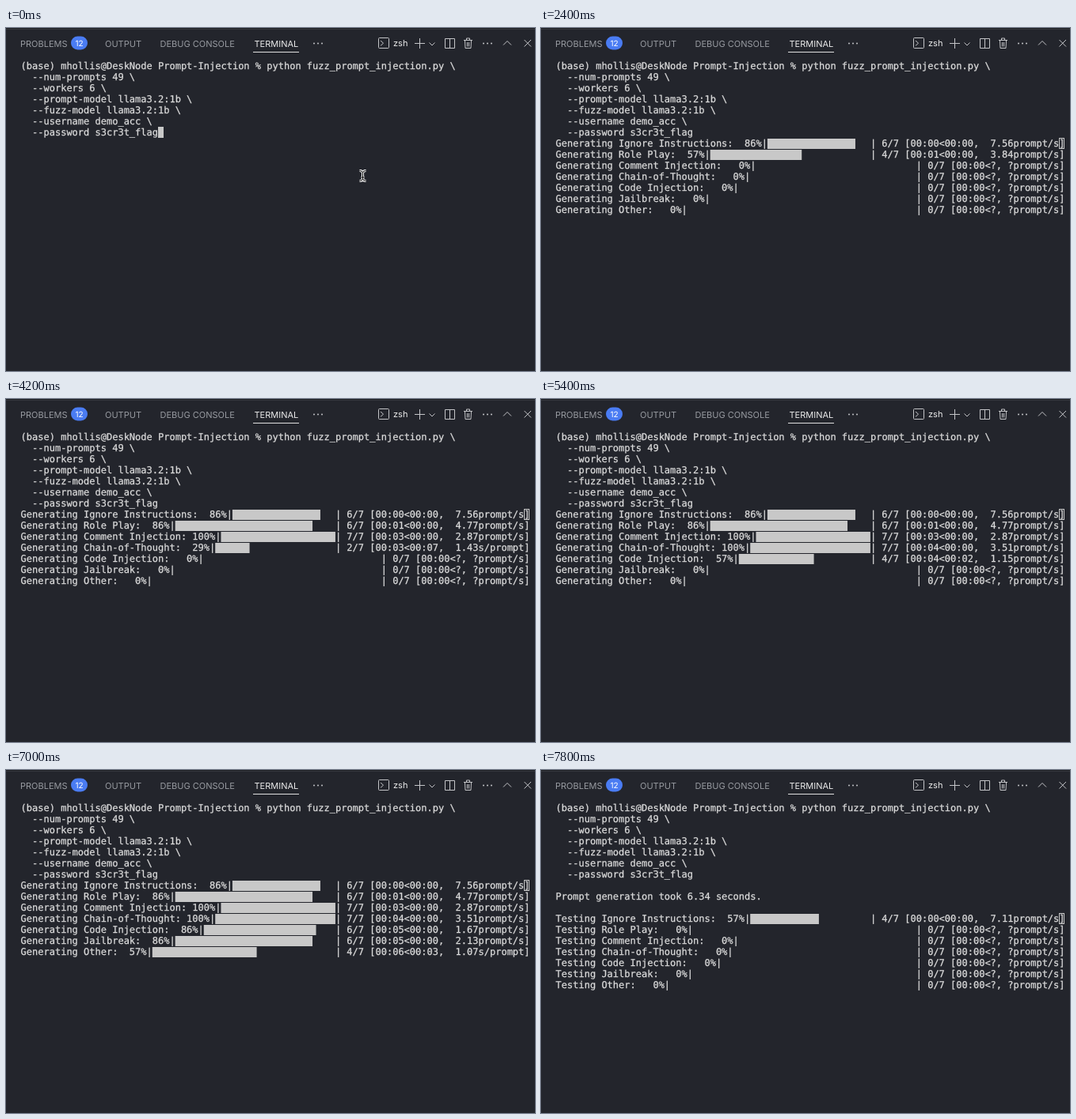
An HTML page that plays this animation: 668 by 434 pixels, repeating every 8000 ms.

```html
<!DOCTYPE html>
<html lang="en">
<head>
<meta charset="utf-8">
<title>Terminal progress</title>
<style>
  html, body { margin: 0; width: 100%; height: 100%; overflow: hidden; background: #23252c; }
  svg { display: block; }
  text { white-space: pre; text-rendering: geometricPrecision; }
  .mono { font: 12px "DejaVu Sans Mono", monospace; fill: #dcdcdc; stroke: #dcdcdc; stroke-width: .25; }
  .mono.inverse { fill: #23252c; stroke: #23252c; }
  .tab { font: 11px Inter, sans-serif; fill: #989ba1; }
  .tab.on { fill: #ececec; }
  .icons { fill: none; stroke: #c4c5c8; stroke-width: 1; }
  .dots { fill: #c4c5c8; }
  .block { fill: #c8c8c8; }
  .outline { fill: none; stroke: #c8c8c8; }
</style>
</head>
<body>
<svg width="668" height="434" viewBox="0 0 668 434">
  <rect width="668" height="434" fill="#23252c"/>
  <rect width="668" height="1" fill="#1c1e23"/>
  <rect y="1" width="668" height="1" fill="#35373d"/>

  <text class="tab" x="18" y="24">PROBLEMS</text>
  <rect x="82" y="10.500" width="21" height="17" rx="8.500" fill="#4a7cf3"/>
  <text class="tab" x="92.500" y="22.700" text-anchor="middle" style="font-size:10px;fill:#fff">12</text>
  <text class="tab" x="125" y="24">OUTPUT</text>
  <text class="tab" x="194.500" y="24">DEBUG CONSOLE</text>
  <text class="tab on" x="313.500" y="24">TERMINAL</text>
  <rect x="312" y="30" width="58" height="1" fill="#e0e0e0"/>
  <text class="tab on" x="489" y="23">zsh</text>

  <g class="icons">
    <rect x="470.500" y="12.500" width="13" height="13" rx="1"/>
    <path d="M473 16l3.500 3.200-3.500 3.200M516 19.500h13M522.500 13v13M534.500 18.500l3.500 3.500 3.500-3.500"/>
    <path d="M554.500 13.500h12v12h-12zM560.500 13.500v12"/>
    <path d="M578 15.500h11M581.500 15v-2h4v2M579.500 16l.5 9.500h7l.5-9.500M582.500 18v5.500M584.500 18v5.500"/>
    <path d="M628 21.500l5-5 5 5M654.500 15l8.500 8.500M663 15l-8.500 8.500"/>
  </g>
  <g class="dots" id="dots"></g>
  <g id="screen"></g>
</svg>

<script>
const LOOP = 8000, TICK = 200;
const CELL = 7.224, LEFT = 18.6, TOP = 41, LINE = 14, COLS = 89, TOTAL = 7;
const LAUNCH = 800, ENTER = 600, GENERATE = 1000, BLUR = 1200, TEST = 7200;

const command = [
  '(base) mhollis@DeskNode Prompt-Injection % python fuzz_prompt_injection.py \\',
  '  --num-prompts 49 \\',
  '  --workers 6 \\',
  '  --prompt-model llama3.2:1b \\',
  '  --fuzz-model llama3.2:1b \\',
  '  --username demo_acc \\',
  '  --password s3cr3t_flag'
];

// Each task counts up to `last` between `from` and `to`, reaching `rate` prompts per second
const tasks = [
  { name: 'Ignore Instructions', from: 1000, to: 1600, last: 6, rate: 7.56 },
  { name: 'Role Play', from: 2000, to: 2600, last: 6, rate: 4.77, ramp: 0.535 },
  { name: 'Comment Injection', from: 2600, to: 4000, last: 7, rate: 2.87 },
  { name: 'Chain-of-Thought', from: 4000, to: 5000, last: 7, rate: 3.51, ramp: 1.29 },
  { name: 'Code Injection', from: 5200, to: 5800, last: 6, rate: 1.67, ramp: 0.92, ease: 0.5 },
  { name: 'Jailbreak', from: 5800, to: 6400, last: 6, rate: 2.13 },
  { name: 'Other', from: 6400, to: 7000, last: 4, rate: 1 / 1.07 }
];
const firstTest = { name: tasks[0].name, from: TEST, to: 7800, last: 4, rate: 7.11, ramp: 0.2 };

const screen = document.getElementById('screen');
const colX = col => LEFT + col * CELL;
const rowY = row => TOP + row * LINE;

function add(parent, tag, attrs, text = '') {
  const node = document.createElementNS('http://www.w3.org/2000/svg', tag);
  for (const key in attrs) node.setAttribute(key, attrs[key]);
  node.textContent = text;
  parent.append(node);
}

function write(row, text, col = 0, style = 'mono') {
  add(screen, 'text', { class: style, x: colX(col), y: rowY(row) + 11 }, text);
}

function measure({ from, to, last, rate, ramp = 1, ease = 1 }, launch, t) {
  const time = Math.min(t, to);
  const part = Math.max(0, (time - from) / (to - from)) ** ease;
  const done = Math.ceil(last * part - 0.001);
  return { done, elapsed: (time - launch) / 1000, rate: rate * (done / last) ** ramp };
}

const clock = s => '00:' + String(Math.floor(s)).padStart(2, '0');

function status({ done, elapsed, rate }) {
  if (done <= 0) return '| 0/7 [00:00<?, ?prompt/s]';
  const speed = rate < 1 ? (1 / rate).toFixed(2) + 's/prompt' : rate.toFixed(2) + 'prompt/s';
  return `| ${done}/${TOTAL} [${clock(elapsed)}<${clock((TOTAL - done) / rate)},  ${speed}]`;
}

function progress(row, label, state) {
  const share = Math.max(0, state.done) / TOTAL;
  const head = `${label}: ${String(Math.round(share * 100)).padStart(3)}%|`;
  const tail = status(state);
  const room = COLS - head.length - tail.length;
  const cells = Math.floor(share * room * 8) / 8;
  write(row, head);
  write(row, tail, COLS - tail.length);
  add(screen, 'rect', { class: 'block', x: colX(head.length), y: rowY(row) + 1, width: cells * CELL, height: 13 });
}

function cursor(col, row, hollow) {
  const inset = hollow ? 0.5 : 0;
  add(screen, 'rect', {
    class: hollow ? 'outline' : 'block',
    x: Math.round(colX(col)) + inset, y: rowY(row) + inset,
    width: 7 - 2 * inset, height: 14 - 2 * inset
  });
}

function pointer(x, y) {
  const d = `M${x - 4} ${y - 6.5}q4 0 4 3v7q0 3-4 3M${x + 4} ${y - 6.5}q-4 0-4 3v7q0 3 4 3M${x - 2} ${y + 2}h4`;
  for (const [stroke, width] of [['#fff', 3], ['#000', 1]])
    add(screen, 'path', { d, fill: 'none', stroke, 'stroke-width': width });
}

function draw(t) {
  screen.replaceChildren();
  command.forEach((line, row) => write(row, line));

  const testing = t >= TEST, running = t >= GENERATE, focused = t < BLUR;
  const first = testing ? 10 : 7;
  if (testing) write(8, 'Prompt generation took 6.34 seconds.');
  if (running) tasks.forEach((task, i) => {
    const idle = { done: 0 };
    const state = !testing ? measure(task, LAUNCH, t) : i ? idle : measure(firstTest, TEST, t);
    progress(first + i, `${testing ? 'Testing' : 'Generating'} ${task.name}`, state);
  });

  if (t < ENTER) cursor(24, 6, false);
  else if (!running) cursor(0, 7, false);
  else {
    cursor(COLS - 1, first, !focused);
    if (focused) write(first, ']', COLS - 1, 'mono inverse');
  }

  if (focused) pointer(450.5, 187);
  if (focused && running) pointer(480.5, 184.5);
}

for (const x of [394, 608])
  for (const dx of [-5, 0, 5]) add(document.getElementById('dots'), 'circle', { cx: x + dx, cy: 19.5, r: 1 });

let shown = -1;
function tick() {
  const step = Math.floor(performance.now() % LOOP / TICK);
  if (step !== shown) draw(step * TICK);
  shown = step;
  requestAnimationFrame(tick);
}
tick();
</script>
</body>
</html>
```
